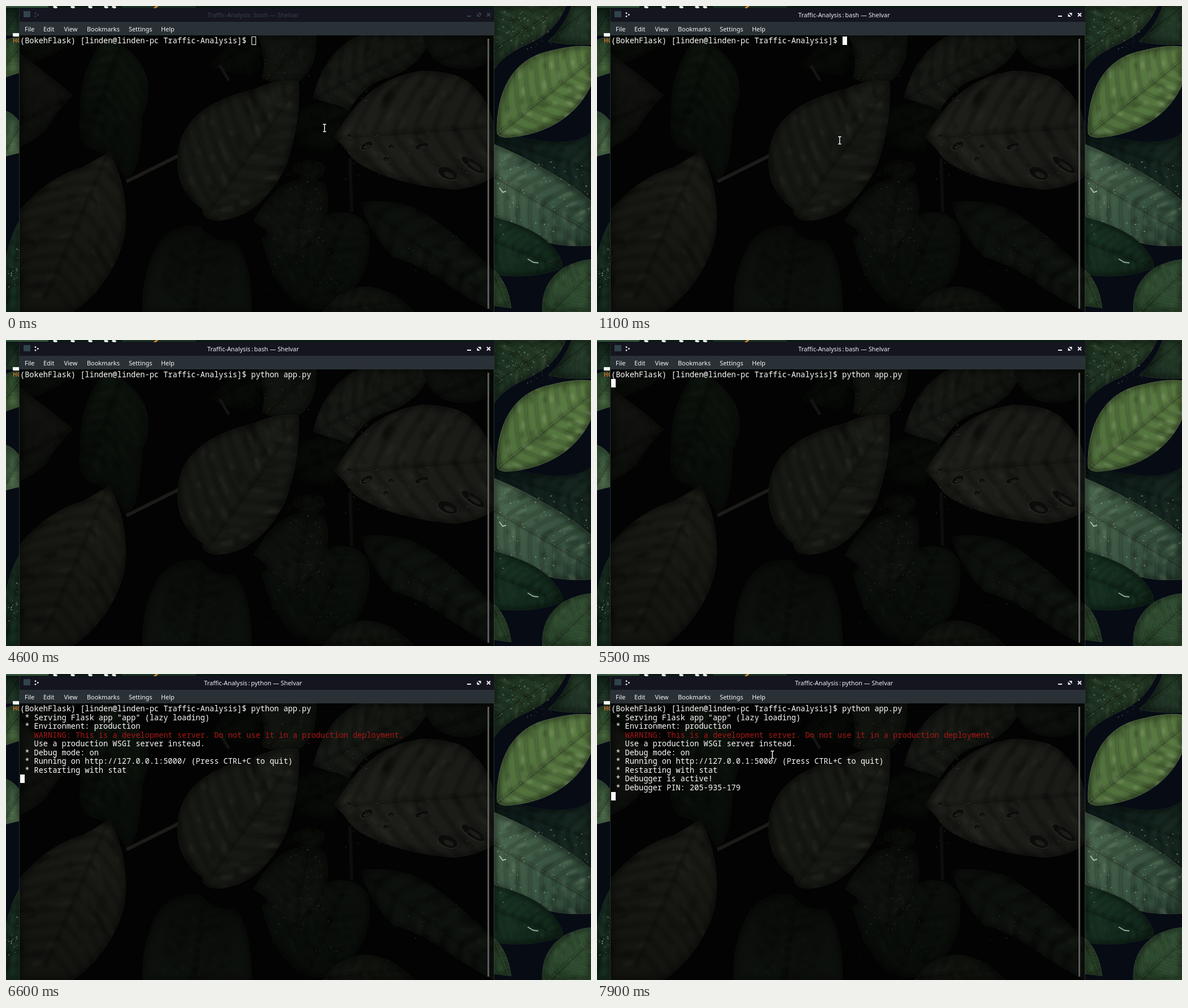
Recreate the animation shown at these times as an HTML page with a canvas. Size 1034 by 542 pixels, loop 8000 ms.

```html
<!DOCTYPE html>
<html lang="en">
<head>
<meta charset="utf-8">
<title>Terminal session</title>
<style>
html, body { margin: 0; width: 100%; height: 100%; overflow: hidden; background: #060b14; }
canvas { display: block; }
</style>
</head>
<body>
<canvas id="stage" width="1034" height="542"></canvas>
<script>
const W = 1034, H = 542, LOOP = 8000;
const COL = 8.167, ROW = 15.5, LEFT = 25, TOP = 54;
const UI = '10.9px "Noto Sans", sans-serif';
const MONO = '13.61px "Noto Sans Mono", monospace';
const stage = document.getElementById('stage').getContext('2d');
const backdrop = document.createElement('canvas');
backdrop.width = W;
backdrop.height = H;
let c = backdrop.getContext('2d');

let seed = 7;
const random = () => (seed = seed * 16807 % 2147483647) / 2147483647;

function box(color, x, y, w, h) {
  c.fillStyle = color;
  c.fillRect(x, y, w, h);
}

function line(color, width, ...p) {
  c.strokeStyle = color;
  c.lineWidth = width;
  c.beginPath();
  for (let i = 0; i < p.length; i += 2) c.lineTo(p[i], p[i + 1]);
  c.stroke();
}

function oval(color, x, y, rx, ry, tilt = 0) {
  c.fillStyle = color;
  c.beginPath();
  c.ellipse(x, y, rx, ry, tilt, 0, 7);
  c.fill();
}

function label(text, x, y, color, font) {
  c.fillStyle = color;
  c.font = font;
  c.fillText(text, x, y);
}

function clipped(shape, draw) {
  c.save();
  c.clip(shape);
  draw();
  c.restore();
}

function area(x, y, w, h) {
  const p = new Path2D();
  p.rect(x, y, w, h);
  return p;
}

function drawVeins(color, width, length, count) {
  c.strokeStyle = color;
  c.lineWidth = width;
  for (let i = 0; i < count; i++) {
    const x = i * length / count;
    for (const side of [-1, 1]) {
      c.beginPath();
      c.moveTo(x, 0);
      c.quadraticCurveTo(x + length * .08, side * length * .2, x + length * .3, side * length * .42);
      c.stroke();
    }
  }
}

// An outline shaded along its midrib, with soft mottling, paired veins and a dim rim.
function leaf(outline, from, to, [x0, y0, x1, y1], glow = .025, veins = 8) {
  const shape = new Path2D(outline);
  const length = Math.hypot(x1 - x0, y1 - y0);
  const light = `rgba(225,235,190,${glow})`;
  const fill = c.createLinearGradient(x0, y0, x1, y1);
  fill.addColorStop(0, from);
  fill.addColorStop(1, to);
  c.fillStyle = fill;
  c.fill(shape);
  clipped(shape, () => {
    c.filter = 'blur(4px)';
    c.strokeStyle = 'rgba(0,0,0,.35)';
    c.lineWidth = 12;
    c.stroke(shape);
    c.translate(x0, y0);
    c.rotate(Math.atan2(y1 - y0, x1 - x0));
    c.filter = 'blur(2px)';
    for (let i = 0; i < 70; i++) {
      const x = random() * length, y = (random() - .5) * length * .8;
      oval(i % 2 ? 'rgba(0,0,0,.18)' : light, x, y, length * (.02 + random() * .04), length * .018, y < 0 ? -.9 : .9);
    }
    drawVeins('rgba(0,0,0,.22)', length / veins * .25, length, veins);
    line('rgba(0,0,0,.4)', 4, -9, 1, length, 1);
    c.filter = 'none';
    line(light, 1.5, -9, 0, length, 0);
    drawVeins(light, .8, length, veins);
  });
  c.strokeStyle = light;
  c.lineWidth = 1;
  c.stroke(shape);
}

function drop(x, y, rx, ry, tilt = 0) {
  oval('#272823', x, y, rx, ry, tilt);
  oval('#0c0d0b', x + .5, y - .5, rx - 1, ry - 1, tilt);
  oval('#1c1d19', x + rx * .15, y + ry * .2, rx * .5, ry * .4, tilt);
}

function specks(n, x, y, w, h, color) {
  for (let i = 0; i < n; i++) {
    oval(color, x + random() * w, y + random() * h, .4 + random() * 1.3, .4 + random());
  }
}

function drawDesktop() {
  box('#060b14', 0, 0, W, H);
  // right side
  leaf('M863 0H990Q972 45 925 66T863 112Z', '#29402a', '#1d3322', [985, 0, 863, 80], .08);
  leaf('M1034 0V68Q985 70 958 62Q985 40 1000 0Z', '#29442d', '#182a20', [1034, 5, 960, 62], .08);
  leaf('M863 222L930 236Q1000 250 1034 225V345Q960 310 863 250Z', '#0d1a19', '#182a22', [863, 232, 1034, 290], .03);
  leaf('M868 224C866 160 890 95 960 80Q1005 68 1034 72V140C1005 205 940 230 885 233Q868 232 868 224Z',
    '#4f703c', '#5b7c42', [874, 222, 1034, 94], .16, 9);
  leaf('M863 245Q905 262 945 285Q1000 315 1034 345V424Q965 430 915 402T863 372Z', '#49664f', '#2c4636', [863, 300, 1034, 400], .12);
  leaf('M863 374Q935 392 965 425Q990 455 982 465Q930 485 863 476Z', '#183323', '#12291c', [863, 415, 985, 462], .04);
  leaf('M863 468Q888 492 893 535L863 531Z', '#375635', '#2b4a2d', [863, 470, 888, 533], .1, 5);
  leaf('M948 542Q945 492 985 464Q1012 450 1034 449V542Z', '#2b482d', '#365638', [960, 542, 1034, 470], .1);
  specks(70, 864, 8, 100, 70, 'rgba(190,215,185,.28)');
  specks(75, 866, 270, 166, 135, 'rgba(205,225,210,.4)');
  line('#a8bba8', 2, 872, 322, 878, 330, 884, 328);
  line('#91aa96', 2, 922, 448, 932, 454, 941, 455);
  // left side
  leaf('M0 0H24V52H0Z', '#294531', '#0d2018', [0, 40, 24, 0], .06, 4);
  leaf('M0 60L24 52V118L0 126Z', '#4c6f42', '#2c4d31', [0, 100, 24, 70], .1, 4);
  leaf('M0 186Q13 190 24 205V260L0 266Z', '#5c8059', '#3d5e41', [0, 250, 24, 210], .1, 4);
  leaf('M24 380V542H0V445Q8 405 24 380Z', '#173021', '#1e3929', [0, 520, 24, 400], .04, 5);
  specks(22, 0, 430, 24, 70, 'rgba(200,220,205,.45)');
  // strip above the window
  box('#0c1a15', 0, 0, 863, 5);
  box('#33523a', 0, 0, 75, 3);
  box('#1d3123', 205, 0, 130, 3);
  for (const x of [86, 117, 148, 176, 190]) line('#e9ece8', 7, x + 2, 0, x, 4);
  line('#cf8b35', 3, 262, 4, 268, 0);
  box('#f2f4f2', 12, 48, 14, 6);
  label('HO', 12, 65, '#c8702e', 'bold 10px "Noto Sans", sans-serif');
}

function drawFoliage() {
  box('#020302', 24, 52, 839, 490);
  leaf('M24 52H130Q85 95 24 105Z', '#0e110d', '#090c08', [120, 52, 24, 90], .015);
  leaf('M362 105Q385 65 430 52H465Q460 105 430 122Q390 120 362 105Z', '#0b0e0b', '#070907', [362, 105, 450, 60], .015);
  leaf('M445 52H548Q552 105 520 132Q480 142 453 128Q462 90 445 52Z', '#131611', '#10130f', [460, 130, 535, 52]);
  leaf('M543 163C555 105 590 65 625 52H752Q735 105 680 125Q635 135 605 186Q570 170 543 163Z', '#181a16', '#121510', [543, 163, 735, 62]);
  leaf('M735 52H863V90Q830 120 785 108Q748 100 735 52Z', '#0f120f', '#0b0e0a', [750, 100, 863, 58], .02);
  leaf('M175 52Q225 75 245 115Q260 155 240 195C238 260 232 290 214 312Q190 260 150 252C132 245 127 220 132 190Q128 145 150 95Z',
    '#0d130d', '#090d09', [200, 82, 140, 245], .02);
  leaf('M24 85Q72 118 118 158Q90 185 70 220Q48 240 24 250Z', '#0e100d', '#141511', [24, 205, 118, 158], .015);
  leaf('M507 190Q560 155 612 188Q590 240 578 257Q535 258 507 242Z', '#070a07', '#0a0d09', [507, 235, 605, 190], .01);
  line('#1c1b18', 6, 213, 311, 305, 265);
  line('#0c0d0b', 6, 608, 270, 611, 365);
  line('#141512', 5, 378, 105, 394, 132);
  leaf('M242 542Q238 475 270 420Q300 382 345 392Q365 420 405 416Q435 455 434 542Z', '#0d110d', '#0a0d09', [330, 542, 350, 400], .02);
  leaf('M452 412Q500 380 555 375Q610 350 640 390Q650 455 615 500Q570 552 525 532Q475 505 452 412Z', '#090d09', '#0c100c', [530, 532, 600, 375], .02);
  leaf('M627 348Q680 340 728 360Q795 400 863 470V542Q815 518 770 485Q725 455 685 445Q640 400 627 348Z', '#0c100c', '#0f130f', [627, 348, 863, 520], .015);
  leaf('M560 542Q590 500 635 497Q685 500 722 542Z', '#151813', '#0e110c', [570, 535, 715, 520], .02);
  leaf('M495 300Q520 260 560 280Q570 295 545 310Z', '#0b0d09', '#10120e', [500, 300, 560, 282], .02);
  leaf('M438 381Q462 335 495 315Q530 298 563 315Q576 345 562 392Q540 430 510 450Q475 432 458 395Z', '#10130f', '#0c0f0b', [510, 448, 532, 305]);
  leaf('M183 258Q216 320 211 395C205 450 165 512 118 542H24V362Q75 302 135 286Z', '#1b1b16', '#131410', [182, 260, 70, 520], .025, 10);
  leaf('M517 134C521 190 507 250 494 285C470 332 435 376 375 380Q345 379 348 360C300 330 297 270 309 238C328 180 390 160 440 147Q482 128 517 134Z',
    '#161813', '#191b16', [348, 376, 515, 140], .03, 10);
  leaf('M580 233C610 185 645 128 735 115Q805 115 828 145Q856 172 863 215V300Q840 320 795 325C735 322 650 302 612 270Q598 248 580 233Z',
    '#1e1f1a', '#1a1b17', [580, 233, 863, 211]);
  drop(637, 248, 12, 7, -.5);
  drop(671, 272, 6, 5);
  drop(680, 250, 6, 5);
  drop(655, 228, 7, 3, -.4);
  drop(606, 231, 5, 4);
  drop(780, 297, 19, 11, .4);
  drop(734, 249, 13, 6, -.3);
  drop(825, 282, 25, 9, .6);
  specks(55, 600, 225, 240, 85, '#292a25');
  specks(24, 570, 130, 75, 45, '#292b26');
  specks(35, 458, 410, 160, 95, '#20241e');
  specks(28, 690, 390, 110, 85, '#1e231c');
  specks(25, 450, 65, 85, 70, '#23261f');
  specks(25, 485, 310, 75, 110, '#252822');
}

function drawWindow() {
  box('#14151f', 24, 4, 839, 24);
  box('#2a3136', 24, 28, 839, 24);
  box('#31444d', 31, 9, 12, 11);
  const menu = { File: 33, Edit: 66, View: 102.5, Bookmarks: 143, Settings: 217, Help: 274 };
  for (const name in menu) label(name, menu[name], 44.5, '#f3f4f4', UI);
  clipped(area(24, 52, 839, 490), drawFoliage);
  box('#5b5e5b', 851, 58, 3, 478);
  box('#2a3330', 862, 52, 1, 490);
  box('#263028', 23, 4, 1, 538);
}

// Latest entry whose time has come; entries hold a time followed by values.
const latest = (steps, t) => steps.findLast(s => s[0] <= t).slice(1);

const prompt = '(BokehFlask) [linden@linden-pc Traffic-Analysis]$ ';
const typed = [[0, ''], [2000, 'p'], [2300, 'py'], [2400, 'pyt'], [4600, 'python app.py']];
// column and row; none while blinked off
const caret = [[0, 50, 0], [1600], [2000, 51, 0], [2300, 52, 0], [2400, 53, 0], [4600], [5100, 64, 0],
  [5500, 0, 1], [6000], [6500, 0, 1], [6600, 0, 8], [7000], [7600, 0, 10]];
const pointer = [[0, 563, 216], [100, 541, 222], [200, 503, 232], [300, 464, 240], [400, 438, 241],
  [500, 429, 238], [2000], [7600, 397, 190], [7700, 362, 168], [7800, 325, 148], [7900, 310, 143]];
const output = [
  ' * Serving Flask app "app" (lazy loading)',
  ' * Environment: production',
  '   WARNING: This is a development server. Do not use it in a production deployment.',
  '   Use a production WSGI server instead.',
  ' * Debug mode: on',
  ' * Running on http://127.0.0.1:5000/ (Press CTRL+C to quit)',
  ' * Restarting with stat',
  ' * Debugger is active!',
  ' * Debugger PIN: 205-935-179'
];

function drawTitle(t) {
  const color = t < 1100 ? '#3b414b' : '#eff0f1';
  c.textAlign = 'center';
  label(`Traffic-Analysis\u2009:\u2009${t < 6000 ? 'bash' : 'python'} — Shelvar`, 436.7, 19.5, color, UI);
  c.textAlign = 'left';
  for (const y of [12.7, 18.3]) oval(color, 52, y, 1.4, 1.4);
  oval(color, 56.3, 15.5, 1.4, 1.4);
  box(color, 815, 17, 7, 2);
  c.fill(new Path2D('M834 12H839.5V17.5ZM832.5 13.5V19H838Z'));
  line(color, 2, 850, 12.5, 856, 18.5);
  line(color, 2, 856, 12.5, 850, 18.5);
}

function drawTerminal(t) {
  const print = (text, row, color = '#fcfcfc') => label(text, LEFT, 66 + row * ROW, color, MONO);
  print(prompt + latest(typed, t)[0], 0);
  const shown = t < 6600 ? 0 : t < 7600 ? 7 : 9;
  output.slice(0, shown).forEach((text, i) => print(text, i + 1, i === 2 ? '#ab1717' : undefined));
  const [col, row] = latest(caret, t);
  if (col === undefined) return;
  const x = Math.round(LEFT + .3 + col * COL), y = Math.floor(TOP + row * ROW);
  if (t < 1100) {
    c.strokeStyle = '#fcfcfc';
    c.lineWidth = 1;
    c.strokeRect(x + .5, y + .5, 7, 14);
  } else box('#fcfcfc', x, y, 8, 15);
}

function drawPointer(t) {
  const [x, y] = latest(pointer, t);
  if (x === undefined) return;
  for (const [color, width, reach] of [['#000', 3.5, 1], ['#f4f4f4', 1.5, 0]]) {
    line(color, width, x, y - 6, x, y + 6);
    for (const end of [-6.5, 6.5]) line(color, width, x - 3 - reach, y + end, x + 3 + reach, y + end);
  }
}

drawDesktop();
drawWindow();
c = stage;

function frame(now) {
  const t = now % LOOP;
  c.drawImage(backdrop, 0, 0);
  drawTitle(t);
  drawTerminal(t);
  drawPointer(t);
  requestAnimationFrame(frame);
}
requestAnimationFrame(frame);
</script>
</body>
</html>
```
